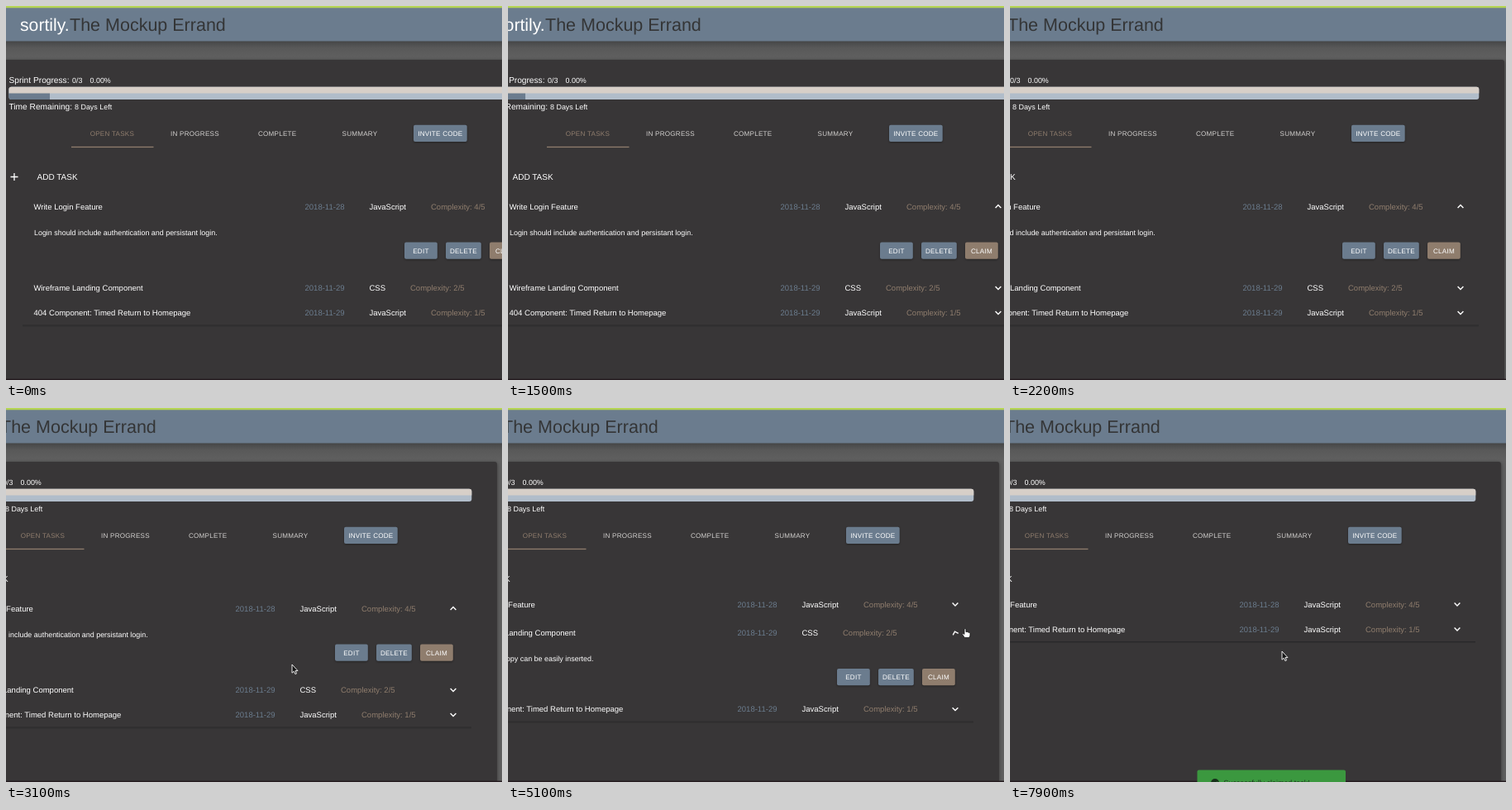
These frames come from a looping animation (600 by 452 pixels, 8 s). An HTML page:

```html
<!DOCTYPE html>
<html lang="en">
<head>
<meta charset="utf-8">
<title>Sprint board</title>
<style>
  html, body { margin: 0; width: 100%; height: 100%; overflow: hidden; background: #383637; }
  svg { display: block; }
  #stage { width: 100vw; height: 100vh; }
  text {
    font-family: "Liberation Sans", Arial, sans-serif; fill: #fff;
    white-space: pre; text-rendering: geometricPrecision;
  }
  .caps { font-size: 8.1px; letter-spacing: .24px; }
  .row { font-size: 9.52px; }
  .small { font-size: 8.93px; }
  .button { filter: drop-shadow(0 1px 1px rgba(0,0,0,.35)); }
</style>
</head>
<body>
<svg id="stage" viewBox="0 0 600 452" preserveAspectRatio="none">
  <defs>
    <linearGradient id="shade" x1="0" y1="0" x2="0" y2="1">
      <stop offset="0" stop-color="#444546"/>
      <stop offset=".4" stop-color="#595959"/>
      <stop offset="1" stop-color="#606060"/>
    </linearGradient>
    <clipPath id="barClip"><rect x="3.5" y="97.8" width="643.8" height="15.2" rx="3"/></clipPath>
  </defs>
  <rect width="600" height="452" fill="#5f5f5f"/>
  <rect y="42" width="600" height="22" fill="url(#shade)"/>
  <rect width="600" height="42.5" fill="#6b7c8e"/>
  <rect width="600" height="2.3" fill="#b5d455"/>
  <g id="page"></g>
  <rect y="450.6" width="600" height="1.4" fill="#241a1e"/>
  <g id="toast"></g>
  <g id="arrow"></g>
  <g id="hand"></g>
</svg>
<script>
const LOOP = 8000, STEP = 100;
const BLUE = '#6b7c8e', TAN = '#8f7d6d', TAN_DARK = '#5c4c42', PALE = '#d2d0ce';
const $ = id => document.getElementById(id);
const page = $('page');

function add(parent, tag, attrs, content) {
  const el = document.createElementNS('http://www.w3.org/2000/svg', tag);
  for (const key in attrs) el.setAttribute(key, attrs[key]);
  if (content) el.textContent = content;
  parent.appendChild(el);
  return el;
}
const rect = (p, x, y, width, height, fill, more) =>
  add(p, 'rect', { x, y, width, height, fill, ...more });
const label = (p, x, y, str, cls, color, more) =>
  add(p, 'text', { x, y, class: cls, style: color ? `fill:${color}` : '', ...more }, str);
const sized = (x, y, str, size, color) =>
  label(page, x, y, str, '', color, { 'font-size': size });
const path = (p, d, more) => add(p, 'path', { d, ...more });

function button(p, x, y, w, str, fill) {
  const face = rect(p, x, y, w, 20.2, fill, { rx: 2, class: 'button' });
  label(p, x + w / 2, y + 13.1, str, 'caps', '', { 'text-anchor': 'middle' });
  return face;
}

// Page header and panel
sized(17, 30, 'sortily.', 21.2);
sized(77, 30, 'The Mockup Errand', 21.5, '#343536');
rect(page, -20, 65, 698, 400, '#383637',
  { rx: 3, style: 'filter:drop-shadow(0 1px 2px rgba(0,0,0,.45))' });

sized(3.5, 92.8, 'Sprint Progress:', 10.2);
label(page, 80, 92.8, '0/3', 'small');
label(page, 101.5, 92.8, '0.00%', 'small');
sized(3.5, 125.2, 'Time Remaining:', 10.2);
label(page, 83, 125.2, '8 Days Left', 'small');

const bar = add(page, 'g', { 'clip-path': 'url(#barClip)' });
rect(bar, 3, 97, 645, 17, '#b1bdca');
rect(bar, 3, 97, 50, 17, BLUE);
rect(bar, 3, 97, 645, 8.5, '#d7cfc8');

[['OPEN TASKS', 101.7, TAN], ['IN PROGRESS', 199, PALE],
 ['COMPLETE', 305, PALE], ['SUMMARY', 406.5, PALE]]
  .forEach(([str, x, color]) => label(page, x, 157, str, 'caps', color));
rect(page, 79, 169.8, 99.5, 1.3, TAN);
button(page, 493, 143.7, 64.7, 'INVITE CODE', BLUE);

path(page, 'M5.5 206.5h9M10 202v9', { stroke: '#fff', 'stroke-width': 1.3 });
label(page, 37.5, 209.8, 'ADD TASK', '', '', { 'font-size': 10 });

// Task rows; y = 0 is the middle of the title line
function task(title, date, lang, level, levelX, note, noteEnd) {
  const g = add(page, 'g', {});
  label(g, 33.5, 3.5, title, 'row');
  label(g, 361.5, 3.5, date, 'row', BLUE);
  label(g, 439.5, 3.5, lang, 'row');
  label(g, levelX, 3.5, `Complexity: ${level}/5`, 'row', TAN);
  const chevron = path(g, 'M-3.4 -1.7L0 1.7L3.4 -1.7',
    { fill: 'none', stroke: '#fff', 'stroke-width': 1.4 });
  const body = add(g, 'svg', { x: 0, y: 16, width: 678, height: 0, overflow: 'hidden' });
  let claim;
  if (note) {
    label(body, noteEnd, 18.9, note, 'small', '', { 'text-anchor': 'end' });
    button(body, 482, 27.5, 39.8, 'EDIT', BLUE);
    button(body, 532, 27.5, 42.8, 'DELETE', BLUE);
    claim = button(body, 585, 27.5, 39.8, 'CLAIM', TAN);
  }
  return {
    claim,
    show: on => g.setAttribute('visibility', on ? 'visible' : 'hidden'),
    place(top, open) {
      g.setAttribute('transform', `translate(0 ${top + 5 * open})`);
      body.setAttribute('height', 68 * open);
      body.setAttribute('visibility', open > 0.01 ? 'inherit' : 'hidden');
      chevron.setAttribute('transform', `translate(625 .2) rotate(${180 * open})`);
    }
  };
}
const login = task('Write Login Feature', '2018-11-28', 'JavaScript', 4, 514,
  'Login should include authentication and persistant login.', 255.7);
const landing = task('Wireframe Landing Component', '2018-11-29', 'CSS', 2, 489,
  'Ensure that copy can be easily inserted.', 187.5);
const missing = task('404 Component: Timed Return to Homepage', '2018-11-29', 'JavaScript', 1, 514);
const edge = add(page, 'g', {});
rect(edge, 20, 0, 627, 1, '#29282a');
rect(edge, 20, 1, 627, 1, '#313031');

// Toast
const toast = $('toast');
rect(toast, 226.5, 0, 179.5, 31, '#3b983f', { rx: 2 });
add(toast, 'circle', { cx: 248, cy: 15.5, r: 5, fill: '#17301a' });
path(toast, 'M245.6 15.6l1.8 1.8l3.2-3.4', { fill: 'none', stroke: '#3b983f', 'stroke-width': 1 });
label(toast, 258.5, 18.7, 'Successfully claimed task!', 'small', '#1c331d');

// Pointers, tip at the group's origin
path($('arrow'), 'M0 0V10.2L2.3 8.2L3.9 11.6L5.5 10.9L4 7.6H7Z',
  { fill: '#151515', stroke: '#fff', 'stroke-width': .9 });
path($('hand'), 'M-1 0Q0-1 1 0V3.6L2.4 3.5L3.8 4L5.2 4.5L6 5.4V8L5 10.6H-.6L-3.4 6.6Q-3.4 5.2-2 5.6L-1 6.5Z',
  { fill: '#fff', stroke: '#111', 'stroke-width': .8 });

// Motion
const SCROLL = [[300, 0], [900, 5], [1200, 14], [1500, 32], [1900, 67], [2200, 80], [2500, 84]];
const POINTER = [[2300, 392, 452], [2800, 346, 310], [3200, 346, 310], [3700, 538, 239],
  [4000, 538, 239], [4300, 520, 239], [4400, 522, 240], [4700, 553, 267], [5400, 553, 267],
  [6000, 534, 326], [6600, 534, 326], [7200, 329, 294]];
const clamp = v => Math.max(0, Math.min(1, v));
const smooth = v => v * v * (3 - 2 * v);
const ramp = (t, start, length) => {
  const v = clamp((t - start) / length);
  return v < .5 ? 4 * v ** 3 : 1 - 4 * (1 - v) ** 3;
};

function track(keys, t, ease = v => v) {
  const i = keys.findIndex(k => k[0] > t);
  if (i === 0) return keys[0].slice(1);
  if (i < 0) return keys[keys.length - 1].slice(1);
  const a = keys[i - 1], b = keys[i];
  const v = ease((t - a[0]) / (b[0] - a[0]));
  return a.slice(1).map((n, j) => n + (b[j + 1] - n) * v);
}

function draw(t) {
  page.setAttribute('transform', `translate(${-track(SCROLL, t)[0]} 0)`);

  const claimed = t >= 7700;
  const openLogin = 1 - ramp(t, 4000, 380);
  const openLanding = claimed ? 0 : ramp(t, 4850, 350);
  const second = 267 + 73.5 * openLogin;
  const third = claimed ? second : second + 30 + 73.5 * openLanding;
  login.place(237, openLogin);
  landing.place(second, openLanding);
  landing.show(!claimed);
  missing.place(third, 0);
  edge.setAttribute('transform', `translate(0 ${third + 15})`);

  const [x, y] = track(POINTER, t, smooth);
  const overClaim = openLanding === 1 && x > 501 && x < 541 && y > 315 && y < 336;
  landing.claim.setAttribute('fill', overClaim ? TAN_DARK : TAN);
  const overRow = t > 3200 && t < 5500 && y < 282;
  const clickable = overClaim || overRow;
  for (const [id, on] of [['arrow', !clickable], ['hand', clickable]]) {
    $(id).setAttribute('transform', `translate(${x} ${y})`);
    $(id).setAttribute('visibility', on && t >= 2300 ? 'visible' : 'hidden');
  }

  toast.setAttribute('transform', `translate(0 ${452 - 14.5 * clamp((t - 7800) / 100)})`);
}

const start = performance.now();
function tick(now) {
  const t = Math.max(0, now - start) % LOOP;
  draw(Math.floor(t / STEP) * STEP);
  requestAnimationFrame(tick);
}
draw(0);
requestAnimationFrame(tick);
</script>
</body>
</html>
```
